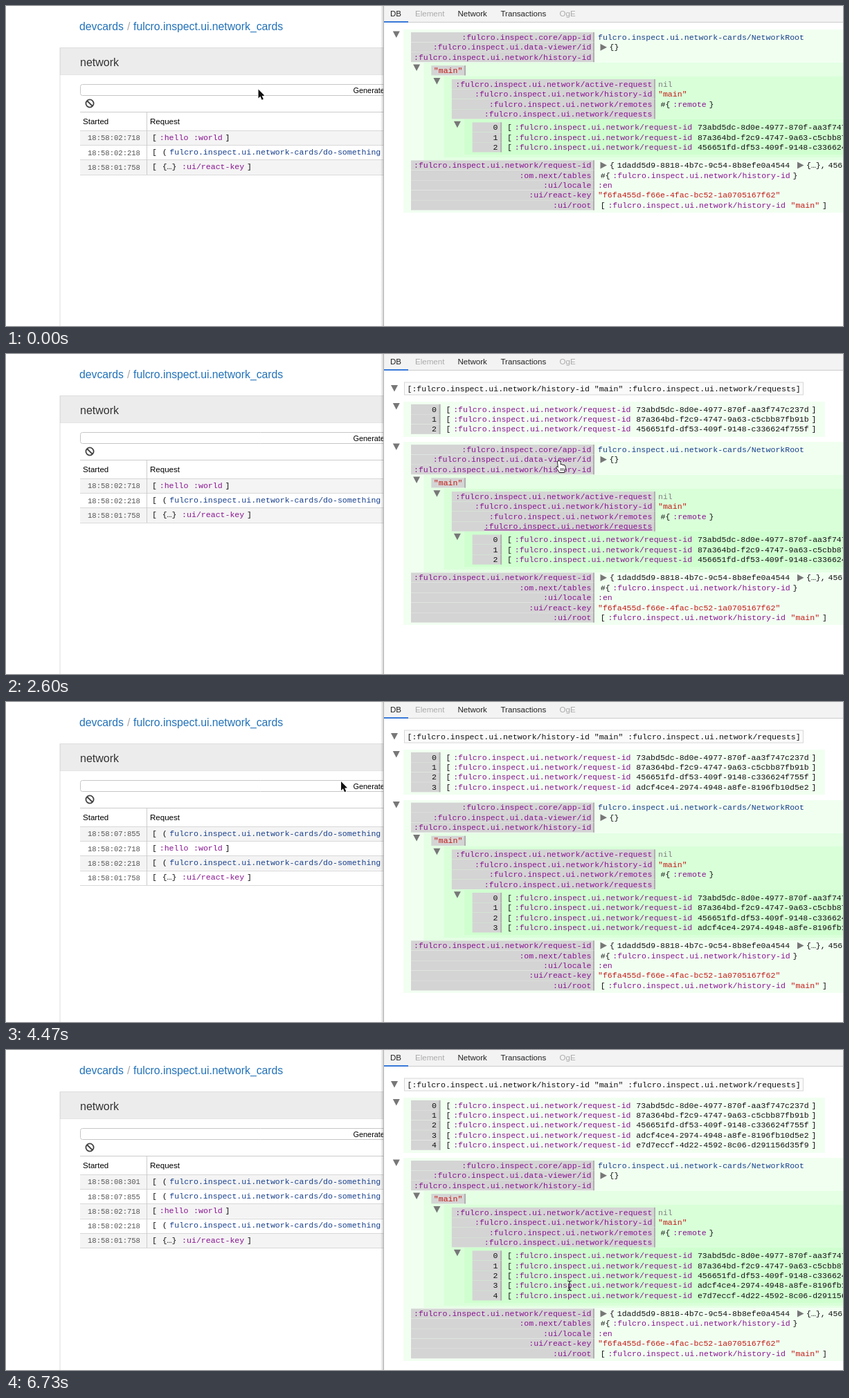
Animation, 1209 px wide and 463 px high, one loop 8.8 s. Source, as an HTML page with a canvas:

```html
<!DOCTYPE html>
<html lang="en">
<head>
<meta charset="utf-8">
<title>Network inspector</title>
<style>
html, body { margin: 0; width: 100%; height: 100%; overflow: hidden; background: #fff; }
canvas { display: block; }
</style>
</head>
<body>
<canvas id="stage" width="1209" height="463"></canvas>
<script>
const ctx = document.getElementById('stage').getContext('2d');
const LOOP = 8800, STEP = 1000 / 15;
const ROW = 14.45, PAD = 10.8, CHAR = 6.931;
const MONO = "11.55px 'Liberation Mono', monospace";
const sans = size => `${size}px 'Liberation Sans', sans-serif`;
const NET = ':fulcro.inspect.ui.network/';
const IDS = [
  '73abd5dc-8d0e-4977-870f-aa3f747c237d',
  '87a364bd-f2c9-4747-9a63-c5cbb87fb91b',
  '456651fd-df53-409f-9148-c336624f755f',
  'adcf4ce4-2974-4948-a8fe-8196fb10d5e2',
  'e7d7eccf-4d22-4592-8c06-d291156d35f9'
];
const CALL = '[ ( fulcro.inspect.ui.network-cards/do-something';
const REQUESTS = [
  ['18:58:01:758', '[ {…} :ui/react-key ]'],
  ['18:58:02:218', CALL],
  ['18:58:02:718', '[ :hello :world ]'],
  ['18:58:07:855', CALL],
  ['18:58:08:301', CALL]
];

// Pointer path: step, x, y, and 1 where the move into the point is eased.
const PATH = [
  [0, 364.5, 120.5], [12, 805, 162, 1], [15, 805, 162], [21, 823, 201], [26, 856, 234],
  [27, 856, 234], [32, 800, 155, 1], [38, 800, 155], [39, 799, 155], [52, 538, 230, 1],
  [53, 520, 222], [54, 500, 190], [55, 489, 157], [58, 484, 113], [60, 484, 113],
  [61, 484, 115], [68, 484, 115], [74, 476, 119], [75, 475, 120], [78, 475, 120],
  [91, 818, 342, 1], [94, 818, 342], [95, 818, 341.5], [99, 818, 341.5], [101, 814, 341]
];
const OPEN = 39, RELEASES = [67, 74], PRESSES = [64, 71];

function pointerAt(step) {
  const i = PATH.findIndex(p => p[0] >= step);
  if (i < 0) return PATH[PATH.length - 1].slice(1, 3);
  if (i === 0) return PATH[0].slice(1, 3);
  const [s0, x0, y0] = PATH[i - 1], [s1, x1, y1, eased] = PATH[i];
  let k = (step - s0) / (s1 - s0);
  if (eased) k = k * k * (3 - 2 * k);
  return [x0 + (x1 - x0) * k, y0 + (y1 - y0) * k];
}

let hover, overKey;

function rect(x, y, w, h, color) {
  ctx.fillStyle = color;
  ctx.fillRect(x, y, w, h);
}

function text(str, x, y, color, font = MONO) {
  ctx.font = font;
  ctx.fillStyle = color;
  ctx.fillText(str, x, y);
}

function shape(points, fill, stroke, width = 1) {
  ctx.beginPath();
  points.forEach(([x, y]) => ctx.lineTo(x, y));
  ctx.closePath();
  if (stroke) { ctx.strokeStyle = stroke; ctx.lineWidth = width; ctx.stroke(); }
  ctx.fillStyle = fill;
  ctx.fill();
}

const arrowDown = (x, y) => shape([[x - 5, y - 4.5], [x + 5, y - 4.5], [x, y + 5]], '#777');
const arrowRight = (x, y) => shape([[x, y - 5], [x + 9.5, y], [x, y + 5]], '#777');

function colorOf(token) {
  if (token[0] === ':') return '#881391';
  if (token[0] === '"') return '#c41a16';
  if (token === 'nil') return '#808080';
  if (token.startsWith('fulcro')) return '#173f8c';
  return '#111';
}

// Space-separated data tokens; brackets sit closer to their contents.
function data(x, yc, str) {
  const isBracket = t => /^#?[[\](){}]$/.test(t);
  const tokens = str.split(' ');
  tokens.forEach((t, i) => {
    text(t, x, yc + 3.5, colorOf(t));
    const next = tokens[i + 1];
    if (!next) return;
    const tight = isBracket(t) !== isBracket(next) && next !== '{…}';
    x += t.length * CHAR + (tight ? 3.8 : 7.7);
  });
}

function cell(x, right, yc) {
  const y = yc - ROW / 2;
  rect(x, y, right - x, 14.2, '#d4d4d4');
  rect(right - 2, y, 2, 14.2, '#b0b0b0');
}

function key(x, right, yc, name) {
  cell(x, right, yc);
  const w = name.length * CHAR, tx = right - 4.6 - w;
  text(name, tx, yc + 3.5, colorOf(name));
  const [hx, hy] = hover;
  if (hx >= x && hx < right && Math.abs(hy - yc) < ROW / 2) {
    overKey = true;
    rect(tx, yc + 4.5, w, 1, colorOf(name));
  }
}

function box(x, top, bottom, right = 1209) {
  const y = Math.floor(top);
  rect(x, y, right - x, Math.round(bottom) - y, 'rgba(100,255,100,0.09)');
  arrowDown(x - 10.4, top + 6.4);
}

function idRows(x, yc, count) {
  for (let i = 0; i < count; i++, yc += ROW) {
    cell(x, x + 42.5, yc);
    text(String(i), x + 30, yc + 3.5, '#111');
    data(x + 50.4, yc, `[ ${NET}request-id ${IDS[i]} ]`);
  }
}

function drawTree(top, count) {
  const inner = top + 130.3;
  const innerEnd = inner + 2 * PAD + ROW * (count - 1);
  const tail = innerEnd + 15.3;
  box(574.2, top, tail + 4 * ROW + PAD);
  box(603.5, top + 48.1, innerEnd + 7.2);
  box(632.8, top + 67.7, innerEnd + 3.6);
  box(662.3, inner, innerEnd);

  const rootKey = (yc, name) => key(585, 850, yc, name);
  const head = top + PAD;
  rootKey(head, ':fulcro.inspect.core/app-id');
  data(855, head, 'fulcro.inspect.ui.network-cards/NetworkRoot');
  rootKey(head + ROW, ':fulcro.inspect.ui.data-viewer/id');
  arrowRight(858.5, head + ROW);
  data(871.5, head + ROW, '{}');
  rootKey(head + 2 * ROW, NET + 'history-id');

  key(614.3, 664, top + 58.9, '"main"');
  [['active-request', 942, 'nil'], ['history-id', 942, '"main"'],
   ['remotes', 945.6, '#{ :remote }'], ['requests']].forEach(([name, x, value], i) => {
    const yc = top + 78.6 + i * ROW;
    key(643.8, 938, yc, NET + name);
    if (value) data(x, yc, value);
  });
  idRows(673.6, inner + PAD, count);

  [[NET + 'request-id', 872, '{ 1dadd5d9-8818-4b7c-9c54-8b8efe0a4544'],
   [':om.next/tables', 858.7, `#{ ${NET}history-id }`],
   [':ui/locale', 855, ':en'],
   [':ui/react-key', 855, '"f6fa455d-f66e-4fac-bc52-1a0705167f62"'],
   [':ui/root', 858.7, `[ ${NET}history-id "main" ]`]].forEach(([name, x, value], i) => {
    rootKey(tail + i * ROW, name);
    data(x, tail + i * ROW, value);
  });
  arrowRight(858.5, tail);
  arrowRight(1143, tail);
  data(1156, tail, '{…},');
  data(1187.5, tail, IDS[2]);
}

function drawInspector(opened, count) {
  const shade = ctx.createLinearGradient(541, 0, 546, 0);
  shade.addColorStop(0, 'rgba(0,0,0,0)');
  shade.addColorStop(1, 'rgba(0,0,0,0.22)');
  rect(541, 0, 5, 463, shade);
  rect(545, 0, 664, 463, '#fff');
  rect(545, 0, 1, 463, '#b5b5b5');
  rect(546, 0, 663, 23, '#f3f3f3');
  rect(546, 23, 663, 1, '#ccc');
  rect(546, 22, 35, 2, '#3879d9');
  [['DB', 555], ['Element', 591, 1], ['Network', 652.5], ['Transactions', 714.5], ['OgE', 799.5, 1]]
    .forEach(([label, x, off]) => text(label, x, 15, off ? '#aaa' : '#222', sans(11.55)));

  if (!opened) return drawTree(34.5, count);
  arrowDown(561, 49.5);
  rect(575, 40.5, 577, 19, '#d8d8d8');
  rect(576, 41.5, 575, 17, '#fafafa');
  text(`[${NET}history-id "main" ${NET}requests]`, 579.5, 53.5, '#111');
  const listEnd = 69.2 + 2 * PAD + ROW * (count - 1);
  box(574.2, 69.2, listEnd, 1183);
  idRows(585, 80, count);
  drawTree(listEnd + 7.9, count);
}

function drawButton(pressed) {
  ctx.beginPath();
  ctx.roundRect(107.5, 113.5, 520, 16, 3);
  ctx.fillStyle = '#fff';
  if (pressed) {
    const blue = ctx.createLinearGradient(0, 113, 0, 130);
    blue.addColorStop(0, '#68b0fa');
    blue.addColorStop(1, '#1469f5');
    ctx.fillStyle = blue;
  }
  ctx.fill();
  ctx.strokeStyle = pressed ? '#3f86e8' : '#c6c6c6';
  ctx.lineWidth = 1;
  ctx.stroke();
  text('Generate', 501.5, 125.7, pressed ? '#fff' : '#000', sans(10.9));
}

function drawPage(count, pressed) {
  text('devcards', 106, 35.4, '#2272b9', sans(15.75));
  text('/', 175, 35.4, '#aaa', sans(15.75));
  text('fulcro.inspect.ui.network_cards', 184, 35.4, '#2272b9', sans(15.75));
  rect(78, 60, 468, 40, '#ddd');
  rect(79, 61, 467, 38.5, '#ececec');
  rect(77.5, 60, 1, 403, '#ddd');
  text('network', 107, 86.5, '#333', sans(16));
  drawButton(pressed);

  ctx.strokeStyle = '#444';
  ctx.lineWidth = 1.8;
  ctx.beginPath();
  ctx.arc(121, 141, 5.6, 0, 7);
  ctx.moveTo(117, 137);
  ctx.lineTo(125, 145);
  ctx.stroke();

  rect(107, 153, 439, 1, '#ccc');
  text('Started', 111, 170.5, '#000', sans(11.55));
  text('Request', 208, 170.5, '#000', sans(11.55));
  REQUESTS.slice(0, count).reverse().forEach(([time, value], i) => {
    const y = 180 + i * 21.2, yc = y + 10.6;
    const hot = hover[0] < 546 && hover[1] >= y && hover[1] < y + 21.2;
    rect(107, y, 439, 21.2, hot ? '#e6edf6' : i % 2 ? '#fff' : '#f4f4f4');
    rect(107, Math.round(y), 439, 1, '#d8d8d8');
    text(time, 118, yc + 3.7, '#555', "10.55px 'Liberation Mono', monospace");
    data(211, yc - 0.3, value);
  });
  const end = Math.round(180 + count * 21.2);
  rect(107, end, 439, 1, '#d8d8d8');
  rect(203, 153, 1, end - 153, '#ccc');
}

function drawCursor(x, y) {
  ctx.save();
  ctx.translate(x, y);
  ctx.lineJoin = 'round';
  if (overKey) {
    shape([[-2, 1], [-1, 0], [0.5, 0], [1.5, 1], [1.8, 5.5], [3.5, 5], [5, 6], [7, 6], [8.5, 7.5],
      [9, 11], [7.5, 13.5], [7.2, 16], [0.5, 16], [-1, 13.5], [-4, 9.5], [-3, 8.3], [-1.2, 9.8]],
      '#fff', '#222', 1.8);
    [2, 4.2, 6.4].forEach(dx => rect(dx, 10, 0.8, 4, '#222'));
  } else if (x > 574 && y > 34) {
    ctx.beginPath();
    for (const s of [-1, 1]) {
      ctx.moveTo(-3, 7 * s);
      ctx.quadraticCurveTo(0, 7 * s, 0, 5 * s);
      ctx.quadraticCurveTo(0, 7 * s, 3, 7 * s);
    }
    ctx.moveTo(0, -6);
    ctx.lineTo(0, 6);
    ctx.moveTo(-2, 3);
    ctx.lineTo(2, 3);
    ctx.strokeStyle = '#222';
    ctx.lineWidth = 1.1;
    ctx.stroke();
  } else {
    shape([[0, 0], [0, 13], [2.9, 10.3], [5, 15.3], [7.3, 14.3], [5.2, 9.5], [9, 9.3]],
      '#111', '#fff', 1.8);
  }
  ctx.restore();
}

function draw(ms) {
  const step = Math.floor((ms + 5) / STEP);
  const opened = step >= OPEN;
  const count = 3 + RELEASES.filter(s => step >= s).length;
  const pressed = PRESSES.some((s, i) => step >= s && step < RELEASES[i]);
  // Hover state trails the pointer by one step; the tree shifts beneath it on opening.
  hover = pointerAt(Math.max(0, step - 1));
  if (step === OPEN) hover[1] += 93.1;
  overKey = false;
  rect(0, 0, 1209, 463, '#fff');
  drawPage(count, pressed);
  drawInspector(opened, count);
  drawCursor(...pointerAt(step));
}

const start = performance.now();
function tick() {
  draw((performance.now() - start) % LOOP);
  requestAnimationFrame(tick);
}
tick();
</script>
</body>
</html>
```
